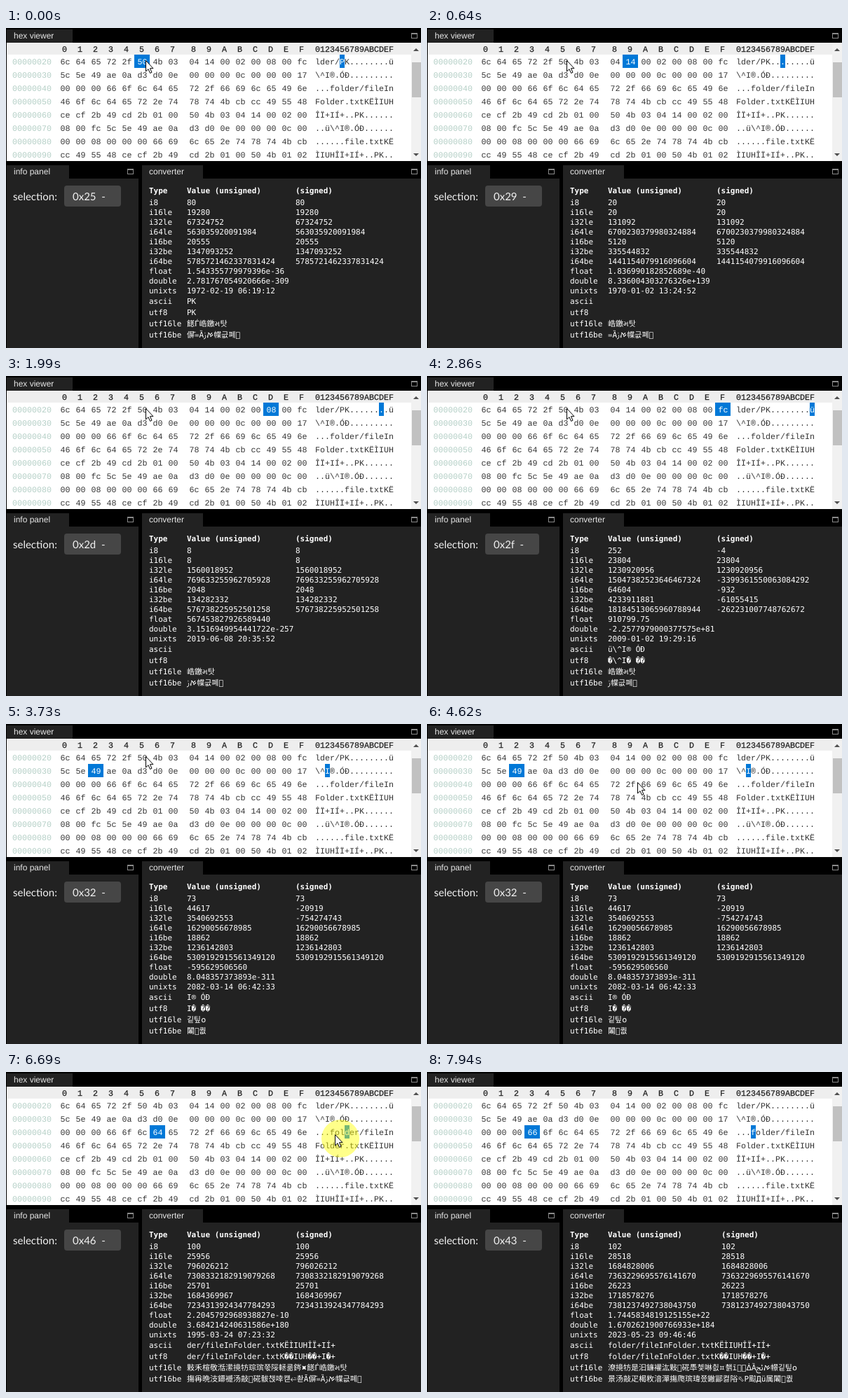
An HTML page for the animation above (7990 ms loop, 592x457 px).

```html
<!DOCTYPE html>
<html lang="en">
<head>
<meta charset="utf-8">
<title>hex viewer</title>
<style>
  html, body { margin: 0; width: 100%; height: 100%; overflow: hidden; background: #000; }
  svg { display: block; width: 592px; height: 457px; }
  text { text-rendering: geometricPrecision; white-space: pre; }
  .tab { font: 12px "Liberation Sans", Arial, sans-serif; fill: #e6e6e6; }
  .hex { font: 11.666px "Liberation Mono", monospace; fill: #333; }
  .mid { text-anchor: middle; }
  .addr { fill: #b4cfc6; }
  .head { fill: #222; stroke: #222; stroke-width: .25px; }
  .sel { fill: #fff; }
  .conv { font: 11px "DejaVu Sans Mono", "Noto Sans CJK JP", "Noto Sans", monospace; fill: #fff; }
  .bold { font-weight: bold; }
  .info { font: 15px Lato, sans-serif; fill: #f2f2f2; }
</style>
</head>
<body>
<svg viewBox="0 0 592 457"></svg>
<script>
const LOOP = 7990;
const BASE = 0x20;
const BLUE = '#0078d7';
const DUMP = `
  6c 64 65 72 2f 50 4b 03 04 14 00 02 00 08 00 fc
  5c 5e 49 ae 0a d3 d0 0e 00 00 00 0c 00 00 00 17
  00 00 00 66 6f 6c 64 65 72 2f 66 69 6c 65 49 6e
  46 6f 6c 64 65 72 2e 74 78 74 4b cb cc 49 55 48
  ce cf 2b 49 cd 2b 01 00 50 4b 03 04 14 00 02 00
  08 00 fc 5c 5e 49 ae 0a d3 d0 0e 00 00 00 0c 00
  00 00 08 00 00 00 66 69 6c 65 2e 74 78 74 4b cb
  cc 49 55 48 ce cf 2b 49 cd 2b 01 00 50 4b 01 02`;
const bytes = Uint8Array.from(DUMP.trim().split(/\s+/), h => parseInt(h, 16));
const view = new DataView(bytes.buffer);

// time, selected offset
const SELECTIONS = [
  [0, 0x25], [180, 0x26], [420, 0x27], [530, 0x28], [640, 0x29], [1150, 0x2a],
  [1610, 0x2b], [1790, 0x2c], [1990, 0x2d], [2450, 0x2e], [2860, 0x2f], [3190, 0x30],
  [3320, 0x31], [3730, 0x32], [5200, 0x46], [6740, 0x43],
];
// start, end, steps, x, y, easing
const smooth = k => k * k * (3 - 2 * k);
const linear = k => k;
const MOVES = [
  [4010, 4610, 13, 300, 83, k => k ** 1.25],
  [4660, 4800, 4, 339, 92, linear],
  [4850, 5080, 5, 207, 80, linear],
  [5590, 6180, 12, 469, 89, smooth],
  [7400, 7895, 12, 262, 382, smooth],
];
const CLICKS = [[30, 80], [5150, 5260], [6690, 6790]];
const CURSOR_GONE = 7940;

const svg = document.querySelector('svg');
function add(tag, attrs, content = '') {
  const el = document.createElementNS('http://www.w3.org/2000/svg', tag);
  for (const name in attrs) el.setAttribute(name, attrs[name]);
  el.textContent = content;
  return svg.appendChild(el);
}
const rect = (x, y, width, height, fill, more) => add('rect', { x, y, width, height, fill, ...more });
const text = (x, y, cls, content) => add('text', { x, y, class: cls }, content);
const place = (el, x, y) => { el.setAttribute('x', x); el.setAttribute('y', y); };

const hex = (n, len) => n.toString(16).padStart(len, '0');
const cellX = col => 73 + 22 * col + (col > 7 ? 8 : 0);
const rowY = row => 38 + 19 * row;
const charX = col => 441 + 7 * col;
const glyph = b => (b > 31 && b < 127) || b > 160 ? String.fromCharCode(b) : '.';

function panel(x, y, width, height, tabWidth, title, fill) {
  rect(x, y, tabWidth, 20, '#222');
  rect(x, y + 19, width, height - 19, fill);
  text(x + 10, y + 13, 'tab', title);
  const right = Math.min(x + width, 590);
  const iconX = right === 590 ? 578 : right - 16;
  rect(iconX + .5, y + 5.5, 8, 7, 'none', { stroke: '#8a8a8a' });
  rect(iconX, y + 5, 9, 2, '#8a8a8a');
}

function drawViewer() {
  panel(1, 2, 591, 188, 94, 'hex viewer', '#fff');
  rect(1, 21, 577, 17, '#eee');
  rect(578, 21, 14, 169, '#f1f1f1');
  rect(579, 49, 13, 50, '#c1c1c1');
  add('path', { d: 'M581 33l4-4 4 4zM581 179l4 4 4-4z', fill: '#505050' });
  for (let col = 0; col < 16; col++) {
    const label = col.toString(16).toUpperCase();
    text(cellX(col) + 10.5, 34, 'hex head mid', label);
    text(charX(col), 34, 'hex head', label);
  }
  for (let row = 0; row < 8; row++) {
    const y = rowY(row) + 14;
    const line = [...bytes.slice(row * 16, row * 16 + 16)];
    text(9, y, 'hex addr', hex(BASE + row * 16, 8));
    line.forEach((b, col) => text(cellX(col) + 11.5, y, 'hex mid', hex(b, 2)));
    text(charX(0), y, 'hex', line.map(glyph).join(''));
  }
}

drawViewer();
const cell = rect(0, 0, 22, 19, BLUE);
const cellText = text(0, 0, 'hex mid sel');
const charBack = rect(0, 0, 7, 19, '#fff');
const charBox = rect(0, 0, 7, 19, BLUE);
const charText = text(0, 0, 'hex sel');

panel(1, 196, 188, 261, 89, 'info panel', '#222');
text(10, 246, 'info', 'selection:');
const button = rect(83, 225, 79, 30, '#464646', { rx: 4 });
const buttonText = text(95, 246, 'info');

panel(194, 196, 398, 261, 87, 'converter', '#222');
text(204, 236, 'conv bold', 'Type');
text(258, 236, 'conv bold', 'Value (unsigned)');
const signedHead = text(413, 236, 'conv bold', '(signed)');
const TYPES = ['i8', 'i16le', 'i32le', 'i64le', 'i16be', 'i32be', 'i64be',
  'float', 'double', 'unixts', 'ascii', 'utf8', 'utf16le', 'utf16be'];
const rows = TYPES.map((type, i) => {
  const y = i < 10 ? 253 + 14 * i : 394 + 16 * (i - 10);
  text(204, y, 'conv', type);
  return [text(258, y, 'conv'), text(413, y, 'conv')];
});

const halo = add('circle', { r: 27, fill: '#ff0', 'fill-opacity': .46 });
const cursor = add('path', {
  d: 'M.5.5V16L4 12.7 6.6 18.5 9 17.4 6.5 11.7H11z',
  fill: '#fff', stroke: '#000', 'stroke-linejoin': 'round',
});

function localTime(seconds) {
  const month = new Date(seconds * 1000).getUTCMonth();
  const summer = seconds > 315532800 && month > 2 && month < 9;
  const shifted = new Date((seconds + (summer ? 7200 : 3600)) * 1000);
  return shifted.toISOString().slice(0, 19).replace('T', ' ');
}

const visible = s => s.replace(/\n/g, ' ').replace(/[\x00-\x1f]/g, '');

function convert(pos) {
  const ints = [[8], [16, true], [32, true], [64, true], [16], [32], [64]].map(([bits, little]) => {
    const kind = bits === 64 ? ['BigUint64', 'BigInt64'] : ['Uint' + bits, 'Int' + bits];
    return kind.map(k => String(view['get' + k](pos, little)));
  });
  const tail = bytes.slice(pos, bytes.indexOf(0, pos));
  const units = [];
  for (let p = pos; p + 1 < bytes.length && view.getUint16(p); p += 2) units.push(p);
  const wide = little => visible(String.fromCharCode(...units.map(p => view.getUint16(p, little))));
  const strings = [
    view.getFloat32(pos, true), view.getFloat64(pos, true),
    localTime(view.getUint32(pos, true)),
    visible(String.fromCharCode(...tail)), visible(new TextDecoder().decode(tail)),
    wide(true), wide(false),
  ];
  return { values: [...ints, ...strings.map(s => [String(s), ''])], signedX: units.length > 27 ? 420 : 413 };
}

let shown = -1;
function select(offset) {
  if (offset === shown) return;
  shown = offset;
  const pos = offset - BASE, col = pos % 16, y = rowY(pos >> 4);
  place(cell, cellX(col), y);
  place(cellText, cellX(col) + 11.5, y + 14);
  cellText.textContent = hex(bytes[pos], 2);
  place(charBack, charX(col), y);
  place(charBox, charX(col), y);
  place(charText, charX(col), y + 14);
  charText.textContent = glyph(bytes[pos]);

  buttonText.textContent = `0x${hex(offset, 2)}\u00a0\u00a0-`;
  button.setAttribute('width', Math.round(buttonText.getComputedTextLength() + 34));

  const { values, signedX } = convert(pos);
  signedHead.setAttribute('x', signedX);
  rows.forEach(([value, signed], i) => {
    [value.textContent, signed.textContent] = values[i];
    signed.setAttribute('x', signedX);
  });
}

function cursorAt(t) {
  let x = 199, y = 46;
  for (const [start, end, steps, toX, toY, ease] of MOVES) {
    if (t < start) break;
    const step = Math.floor((t - start) / (end - start) * (steps - 1) + 1e-6) + 1;
    const k = ease(Math.min(1, step / steps));
    x += (toX - x) * k;
    y += (toY - y) * k;
  }
  return [Math.round(x), Math.round(y)];
}

const show = (el, on) => el.setAttribute('visibility', on ? 'visible' : 'hidden');

function render(t) {
  select(SELECTIONS.findLast(([start]) => t >= start)[1]);
  const [x, y] = cursorAt(t);
  cursor.setAttribute('transform', `translate(${x} ${y})`);
  halo.setAttribute('transform', `translate(${x + 8} ${y + 6})`);
  show(cursor, t < CURSOR_GONE);
  show(halo, CLICKS.some(([from, to]) => t >= from && t < to));
}

const origin = performance.now();
function tick() {
  render((performance.now() - origin) % LOOP);
  requestAnimationFrame(tick);
}
tick();
</script>
</body>
</html>
```
